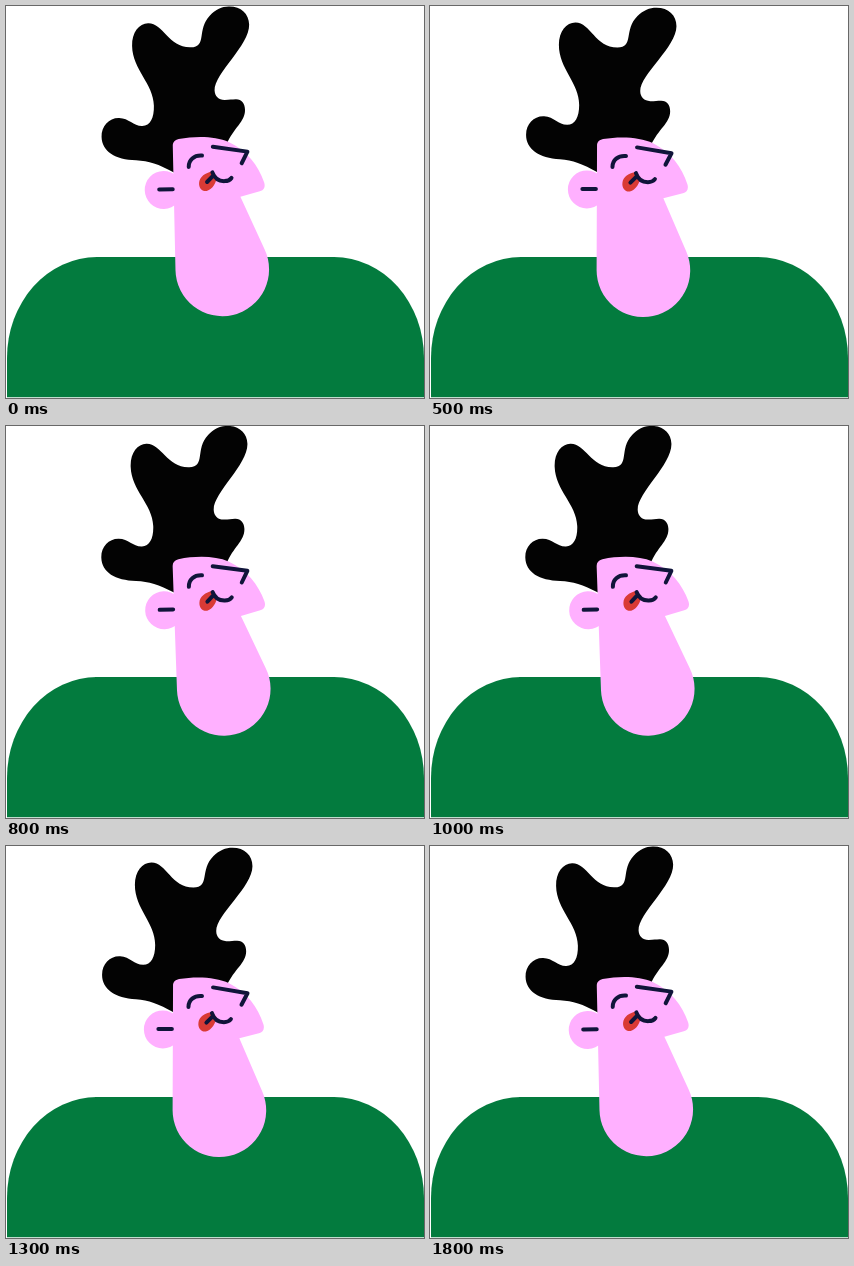
An HTML page without scripts that plays this animation: 418 px wide and 392 px high, repeating every 1900 ms.

```html
<!DOCTYPE html>
<html lang="en">
<head>
<meta charset="utf-8">
<title>Swaying head</title>
<style>
  html, body { margin: 0; width: 100%; height: 100%; overflow: hidden; background: #fff; }
  svg { display: block; width: 100%; height: 100%; }
  .skin { fill: #ffb0ff; }
  .line { fill: none; stroke: #10143a; stroke-width: 4; stroke-linecap: round; stroke-linejoin: round; }
</style>
</head>
<body>
<svg viewBox="0 0 418 392">
  <path fill="#037b3e" d="M1 391.300V352A90 101 0 0 1 91 251H328A90 101 0 0 1 418 352V391.300Z"/>
  <!-- the head turns around a point behind the eye -->
  <g transform="translate(178 150)">
    <g>
      <animateTransform attributeName="transform" type="rotate" dur="1.9s" repeatCount="indefinite" calcMode="discrete"
        values="-1.25;-.6;-.6;0;.15;.2;0;-.9;-2;-2.8;-2;-.9;0;.2;.15;0;-.6;-.6;-1.25"/>
      <g transform="translate(-178 -150)">
        <path fill="#030303" d="M168 166.500C152 157.500 143 154.300 130 153.300C109 152.300 96 143.500 96 129C96 118 104 110 114 110.500C124 111 128 119 137 119C145 119 149 111 149 99C149 77 128.500 63 128.500 39C128.500 25 136 16.500 145 16.500C160 16.500 165 41.500 187 41.500C204 41.500 193 24 207 10C213 4 219 1.500 226 1.500C238 1.500 246 9 246 20C246 41 210 68 210 85C210 91 214 95 220 95C225 95 227 94.500 231 94.500C237 94.500 240 99 240 105C240 117 228 123 221 139L200 160Z"/>
        <circle class="skin" cx="157" cy="183.500" r="19"/>
        <path class="skin" d="M167 264V140C167 136 169 134 173 133C191 130 210 131 223 137C241 146 252 161 257.500 178C259 183 257 186 253 187L233.500 192L256.500 245A46.800 46.800 0 1 1 167 264Z"/>
        <path fill="#d93a35" d="M206 166L210.500 171C210 177 206 184 200 185.500C195 186 192 182 192.500 177C193 171 199 167 206 166Z"/>
        <g class="line">
          <path d="M152.500 183H166"/>
          <path d="M182.500 161C182.500 154 188 149.300 196 150"/>
          <path d="M207 141.300L241.500 147L235.500 158.500"/>
          <path d="M206 167C208 173 212 176 218 176C221 176 223.500 175 225 173M207 170L200.500 176.500"/>
        </g>
      </g>
    </g>
  </g>
</svg>
</body>
</html>
```
